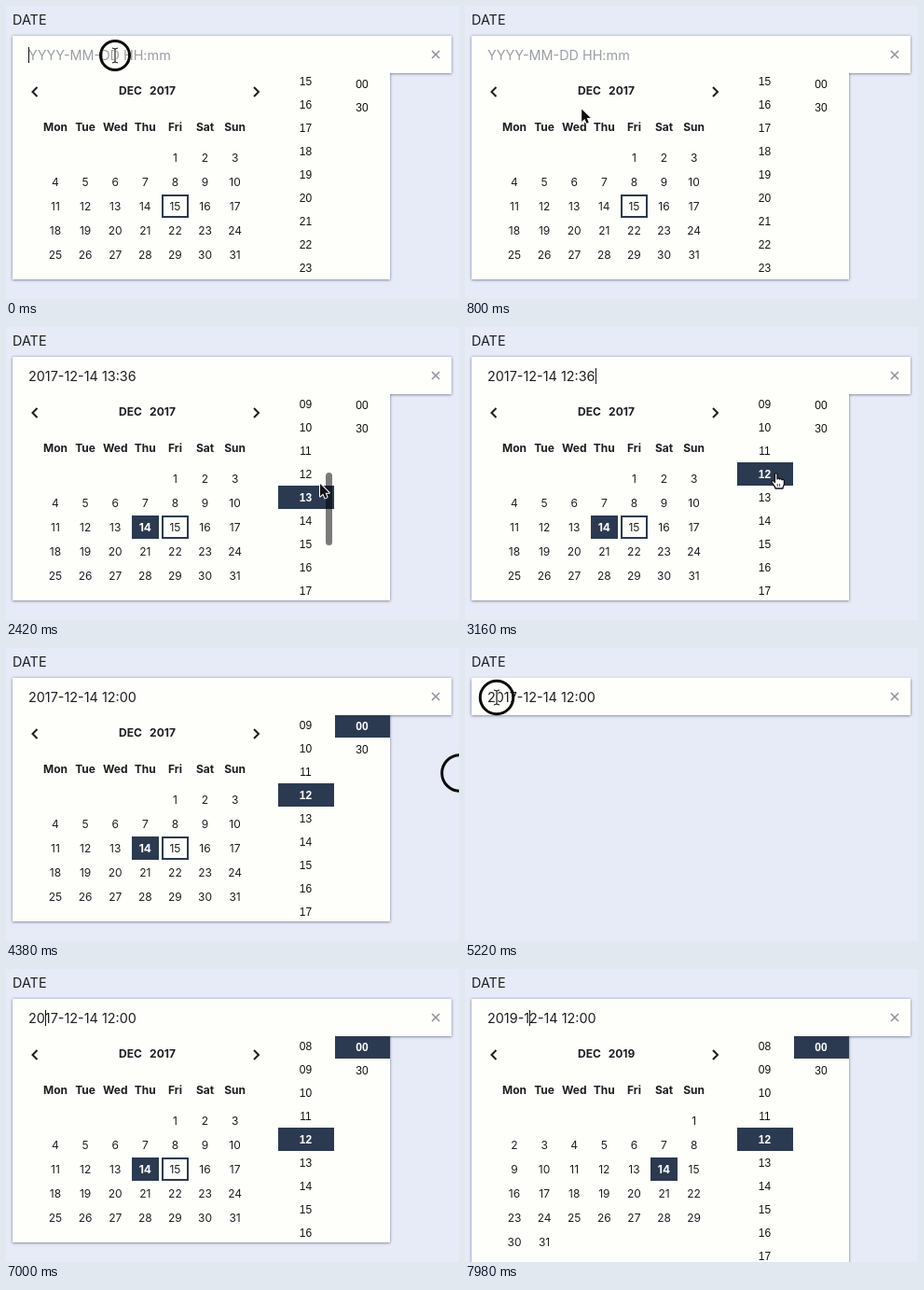
Recreate the animation shown at these times as an HTML page with a canvas. Size 486 by 314 pixels, loop 8000 ms.

```html
<!DOCTYPE html>
<html lang="en">
<head>
<meta charset="utf-8">
<title>Date picker</title>
<style>
html, body { margin: 0; width: 486px; height: 314px; overflow: hidden; background: #e7ebf7; }
canvas { display: block; width: 486px; height: 314px; }
</style>
</head>
<body>
<canvas id="stage" width="486" height="314"></canvas>
<script>
const ctx = document.getElementById('stage').getContext('2d');
const LOOP = 8000;
const UI = 'Inter, Roboto, sans-serif';
const LIST = '"Liberation Sans", Arial, sans-serif';
const PAGE = '#e7ebf7', PAPER = '#fefefa', INK = '#1b1e22', DARK = '#2b3a50', HOVER = '#d2d7e0';
const GRAY = '#8d929e', FAINT = '#999fa6';
const DAYS = ['Mon', 'Tue', 'Wed', 'Thu', 'Fri', 'Sat', 'Sun'];
const LIST_TOP = 72, ROW = 25, TEXT = 14.4;

// Widget state; each step overrides the ones before it.
const steps = [
  { t: 0, open: true, text: '', year: 2017, day: 0, hour: -1, minute: -1, scroll: 379, caret: 0, blink: 0 },
  { t: 1500, text: '2017-12-14 13:36', day: 14, hour: 13, scroll: 227, caret: 16, blink: 1500 },
  { t: 2950, text: '2017-12-14 12:36', hour: 12, blink: 2950 },
  { t: 3690, text: '2017-12-14 12:00', minute: 0, blink: 3690 },
  { t: 4430, open: false },
  { t: 5240, open: true, scroll: 202, caret: 1, blink: 5240 },
  { t: 6980, caret: 2, blink: 6980 },
  { t: 7120, caret: 3, blink: 7120 },
  { t: 7260, caret: 4, blink: 7260 },
  { t: 7400, text: '201-12-14 12:00', caret: 3, blink: 7400 },
  { t: 7580, text: '2019-12-14 12:00', year: 2019, caret: 4, blink: 7580 },
  { t: 7820, caret: 5, blink: 7820 },
  { t: 7960, caret: 6, blink: 7960 }
];

// Pointer moves: start, end, target position.
const moves = [
  [0, 0, 117, 53], [480, 1300, 141, 222], [1600, 2400, 337, 168], [2430, 2780, 334, 157],
  [3160, 3560, 382, 84], [3800, 4200, 487, 134], [4540, 5150, 34, 53],
  [5360, 6030, 5, 63], [6040, 6300, -24, 74]
];

// Mouse button: down, up.
const clicks = [[-120, 20], [1350, 1490], [2790, 2920], [3570, 3690], [4340, 4460], [5160, 5280]];

// Scrollbar: shown, fade start, fade end.
const bars = [[1500, 2600, 2860], [5240, 6220, 6480]];

const clamp = v => Math.max(0, Math.min(1, v));
const ease = v => v * v * (3 - 2 * v);

function stateAt(t) {
  return Object.assign({}, ...steps.filter(s => s.t <= t));
}

function pointerAt(t) {
  let [, , x, y] = moves[0];
  for (const [a, b, tx, ty] of moves.slice(1)) {
    if (t < a) break;
    const k = ease(clamp((t - a) / (b - a)));
    x += (tx - x) * k;
    y += (ty - y) * k;
  }
  return { x, y };
}

function barAlpha(t) {
  const b = bars.find(([on, , off]) => t >= on && t < off);
  return b ? 1 - clamp((t - b[1]) / (b[2] - b[1])) : 0;
}

function box(x, y, w, h, fill) {
  ctx.fillStyle = fill;
  ctx.fillRect(x, y, w, h);
}

function label(str, x, cy, size, { color = INK, weight = 400, family = UI, align = 'center' } = {}) {
  ctx.font = `${weight} ${size}px ${family}`;
  ctx.textAlign = align;
  ctx.fillStyle = color;
  ctx.fillText(str, x, Math.round(cy + size * 0.36));
}

function line(points, width, color) {
  ctx.beginPath();
  points.forEach(([x, y], i) => i ? ctx.lineTo(x, y) : ctx.moveTo(x, y));
  ctx.lineWidth = width;
  ctx.strokeStyle = color;
  ctx.stroke();
}

const inside = (p, x, y, w, h) => p.x >= x && p.x < x + w && p.y >= y && p.y < y + h;

function paper(bottom) {
  ctx.beginPath();
  ctx.moveTo(7, 32);
  ctx.lineTo(478, 32);
  ctx.lineTo(478, 72);
  if (bottom > 72) {
    ctx.lineTo(412, 72);
    ctx.lineTo(412, bottom);
    ctx.lineTo(7, bottom);
  } else ctx.lineTo(7, 72);
  ctx.closePath();
  ctx.save();
  ctx.shadowColor = 'rgba(55,60,95,.75)';
  ctx.shadowBlur = 3;
  ctx.shadowOffsetY = 0.5;
  ctx.fillStyle = PAPER;
  ctx.fill();
  ctx.restore();
}

function input(s, t) {
  const x = 24;
  if (s.text) label(s.text, x, 53, TEXT, { align: 'left' });
  else label('YYYY-MM-DD HH:mm', x, 53, TEXT, { align: 'left', color: FAINT });
  line([[457, 48], [465, 56]], 1.6, GRAY);
  line([[465, 48], [457, 56]], 1.6, GRAY);
  const lit = Math.floor((t - s.blink) / 500) % 2 === 0;
  if (s.open && lit) {
    ctx.font = `400 ${TEXT}px ${UI}`;
    const w = ctx.measureText(s.text.slice(0, s.caret)).width;
    box(Math.round(x + w), 44, 1, 17, '#111');
  }
}

// Draws the month and tells whether the pointer is on a day.
function calendar(s, p, lead) {
  let hot = false;
  line([[33.5, 87], [28.5, 92], [33.5, 97]], 2, INK);
  line([[266, 87], [271, 92], [266, 97]], 2, INK);
  label('DEC', 133.5, 91, 12, { weight: 700 });
  label(s.year, 168, 91, 12, { weight: 700 });
  DAYS.forEach((d, i) => label(d, 53 + i * 32.1, 130, 12, { weight: 700 }));
  for (let d = 1; d <= 31; d++) {
    const cell = lead + d - 1;
    const cx = 53 + (cell % 7) * 32.1, cy = 163 + Math.floor(cell / 7) * 26;
    const left = Math.round(cx - 14.4), top = cy - 13;
    const over = inside(p, left, top, 29, 25), picked = d === s.day;
    hot = hot || over;
    if (picked) box(left, top, 29, 25, DARK);
    else if (over) box(left, top, 29, 25, HOVER);
    if (d === 15 && s.year === 2017) {
      ctx.lineWidth = 2;
      ctx.strokeStyle = DARK;
      ctx.strokeRect(left + 1, top + 1, 27, 23);
    }
    label(d, cx, cy, 12, picked ? { weight: 700, color: '#fff' } : {});
  }
  return hot;
}

function slot(str, x, top, w, h, picked, over) {
  if (picked) box(x, top, w, h, DARK);
  else if (over) box(x, top, w, h, HOVER);
  label(str, x + w / 2 - 0.5, top + h / 2, 12,
    { family: LIST, weight: picked ? 700 : 400, color: picked ? '#fff' : '#111' });
}

function times(s, p, bottom, alpha) {
  let hot = false;
  const two = n => String(n).padStart(2, '0');
  const onBar = alpha > 0.5 && inside(p, 336, LIST_TOP, 16, bottom - LIST_TOP);
  ctx.save();
  ctx.beginPath();
  ctx.rect(292, LIST_TOP, 120, bottom - LIST_TOP);
  ctx.clip();
  for (let h = 0; h < 24; h++) {
    const top = LIST_TOP + h * ROW - s.scroll;
    if (top + ROW < LIST_TOP || top > bottom) continue;
    const over = !onBar && p.y >= LIST_TOP && inside(p, 292, top, 60, ROW);
    hot = hot || over;
    slot(two(h), 292, top, 60, ROW, h === s.hour, over);
  }
  [0, 30].forEach((m, i) => {
    const top = LIST_TOP + i * ROW, over = inside(p, 353, top, 59, 24);
    hot = hot || over;
    slot(two(m), 353, top, 59, 24, m === s.minute, over);
  });
  if (alpha) {
    ctx.globalAlpha = alpha;
    ctx.fillStyle = 'rgba(0,0,0,.52)';
    ctx.beginPath();
    ctx.roundRect(343, LIST_TOP + s.scroll * 0.37, 7, 78, 3.5);
    ctx.fill();
  }
  ctx.restore();
  return hot;
}

const arrow = new Path2D('M0 0V13.5L3.2 10.6L5.3 15.4L7.6 14.4L5.6 9.7H9.7Z');
const hand = new Path2D('M-1.5 1C-1.5-.6 1-.6 1 1V6C1.2 4.6 3.4 4.8 3.5 6.2C4 5 6 5.4 6 6.8' +
  'C6.8 5.8 8.4 6.4 8.4 7.8V11C8.4 13 7 13.6 7 16H-1C-1 14-3.6 11.6-5 9.4C-5.8 8-4 7-2.8 8.2L-1.5 9.5Z');

function pointer(p, kind) {
  ctx.save();
  ctx.translate(p.x, p.y);
  ctx.lineJoin = 'round';
  if (kind === 'text') {
    for (const [w, c] of [[3, 'rgba(255,255,255,.8)'], [1.2, '#222']]) {
      line([[0, -7], [0, 7]], w, c);
      line([[-3, -8], [0, -7], [3, -8]], w, c);
      line([[-3, 8], [0, 7], [3, 8]], w, c);
    }
  } else if (kind === 'hand') {
    ctx.fillStyle = '#fff';
    ctx.strokeStyle = '#111';
    ctx.lineWidth = 1.3;
    ctx.fill(hand);
    ctx.stroke(hand);
    line([[1.2, 11], [1.2, 14]], 0.9, '#333');
    line([[3.6, 11], [3.6, 14]], 0.9, '#333');
  } else {
    ctx.strokeStyle = '#fff';
    ctx.lineWidth = 2;
    ctx.stroke(arrow);
    ctx.fillStyle = '#111';
    ctx.fill(arrow);
  }
  ctx.restore();
}

function ring(p, t, kind) {
  const c = clicks.find(([down, up]) => t >= down && t < up + 100);
  if (!c) return;
  const dy = kind === 'hand' ? 5 : 0;
  ctx.save();
  ctx.globalAlpha = 1 - clamp((t - c[1]) / 100);
  ctx.beginPath();
  ctx.arc(p.x, p.y + dy, 15.5 + 7 * (1 - clamp((t - c[0]) / 90)), 0, Math.PI * 2);
  ctx.lineWidth = 3;
  ctx.strokeStyle = '#0b0b0b';
  ctx.stroke();
  ctx.restore();
}

function draw(t) {
  const s = stateAt(t), p = pointerAt(t);
  const lead = (new Date(s.year, 11, 1).getDay() + 6) % 7;
  const rows = Math.ceil((lead + 31) / 7);
  const bottom = s.open ? 163 + rows * 26 : 72;
  box(0, 0, 486, 314, PAGE);
  label('DATE', 7, 15, TEXT, { align: 'left' });
  paper(bottom);
  let hot = false;
  if (s.open) {
    const onDay = calendar(s, p, lead);
    const onTime = times(s, p, bottom, barAlpha(t));
    hot = onDay || onTime;
  }
  input(s, t);
  const kind = hot ? 'hand' : inside(p, 7, 32, 440, 40) ? 'text' : 'arrow';
  pointer(p, kind);
  ring(p, t, kind);
}

const start = performance.now();
function tick(now) {
  draw(Math.max(0, now - start) % LOOP);
  requestAnimationFrame(tick);
}
draw(0);
requestAnimationFrame(tick);
</script>
</body>
</html>
```
